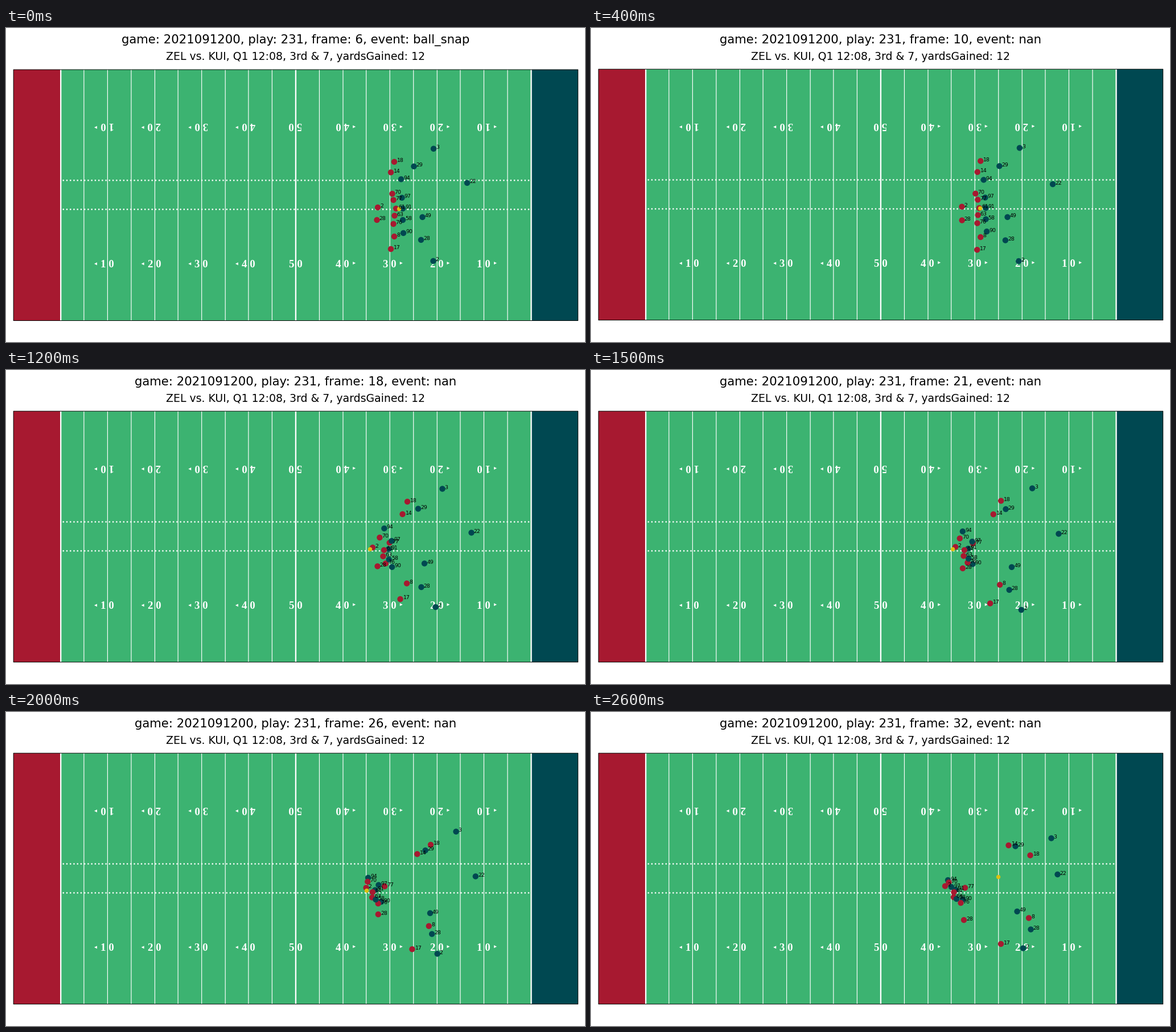
Write a matplotlib script that moves like this. It is 1017 px wide and 551 px high and loops after 2700 ms.

```python
import numpy as np
import matplotlib.pyplot as plt
from matplotlib.animation import FuncAnimation
from matplotlib.patches import Polygon, Rectangle

W, H = 1017, 551
S = W / 1200              # layout unit in pixels
PT = S * 100 / 72         # layout point in pixels
LEFT, TOP, YARD = 15 * S, 72.2, 9.75 * S
DEPTH = 53.3 * YARD
RED, TEAL, GREEN, GOLD = "#a71930", "#004851", "#3cb371", "#dbc010"
FRAMES, FIRST = 27, 6
LAST = FRAMES - 1
EVENTS = {0: "ball_snap", 23: "pass_forward"}

# At 72 dpi one point is one pixel
plt.rcParams["font.family"] = "DejaVu Sans"
fig = plt.figure(figsize=(W / 72, H / 72), dpi=72, facecolor="white")
ax = fig.add_axes([0, 0, 1, 1])
ax.set_xlim(0, W)
ax.axis("off")


def yard_x(yard):
    return LEFT + yard * YARD


def crisp_x(yard):
    """Centre of the layout unit that holds the yard."""
    return (np.floor(yard_x(yard) / S + 0.5) + 0.5) * S


def box(start, end, color, edge="none", z=0):
    x = crisp_x(start)
    ax.add_patch(Rectangle((x, TOP), crisp_x(end) - x, DEPTH, snap=False,
                           facecolor=color, edgecolor=edge, lw=0.8 * PT,
                           zorder=z))


def line(xs, ys, width, style="-"):
    ax.plot(xs, ys, style, color="white", lw=width * PT, snap=False,
            solid_capstyle="butt", zorder=1)


def arrow(x, y, side):
    tip, base = x + 2.7 * side, x - 2.3 * side
    ax.add_patch(Polygon([(tip, y), (base, y - 2.5), (base, y + 2.5)],
                         facecolor="white", edgecolor="none", zorder=2))


def number(x, y, label, angle):
    ax.text(x, y, label, color="white", family="Liberation Serif",
            weight="bold", size=16 * PT, ha="center", va="baseline",
            rotation=angle, rotation_mode="anchor", zorder=2)


def draw_field():
    box(0, 120, GREEN)
    box(0, 10, RED)
    box(110, 120, TEAL)
    for yard in range(10, 111, 5):
        x = crisp_x(yard)
        line([x, x], [TOP, TOP + DEPTH], 2 if yard in (10, 60, 110) else 1)
    for y in (266.5, 317.4):
        line([crisp_x(10.5), crisp_x(110) - 1], [y, y], 2, ":")
    for yard in range(20, 101, 10):
        x = yard_x(yard)
        label = f"{5 - abs(yard - 60) // 10} 0"
        number(x, 419.2, label, 0)
        number(x, 165.6, label, 180)
        side = np.sign(yard - 60)
        if side:
            for y in (412.3, 173):
                arrow(x + 20.3 * side, y - 0.6 * side, side)
    box(0, 120, "none", "black", 3)


def smooth(u):
    return u * u * (3 - 2 * u)


def late(u):
    return u ** 1.6


def slide(ease, start, end):
    """Move from start to end with one easing."""
    start, end = np.array(start), np.array(end)
    return lambda t: start + (end - start) * ease(t / LAST)


def route(*points):
    """Leave from rest and run a smooth curve through the key points."""
    times = np.array([0, 12, 18, LAST])
    pts = np.array(points, float)
    slopes = np.gradient(pts, times, axis=0, edge_order=2)
    slopes[0] = 0

    def at(t):
        k = min(np.searchsorted(times, t, side="right"), len(times) - 1) - 1
        h = times[k + 1] - times[k]
        u = (t - times[k]) / h
        return (pts[k] + (pts[k + 1] - pts[k]) * smooth(u)
                + slopes[k] * h * u * (1 - u) ** 2
                - slopes[k + 1] * h * u * u * (1 - u))
    return at


players = []


def add(jersey, color, path):
    label = ax.text(0, 0, str(jersey), size=8 * PT, color="black", zorder=6)
    players.append((path, color, label))


def ball_at(t):
    # Snap, drop back, wind up, throw
    times = (0, 3, 12, 18, 22, LAST)
    return (np.interp(t, times, (690, 689, 639, 630, 636, 715)),
            np.interp(t, times, (316, 316, 314, 313.5, 313, 289)))


draw_field()

# Coverage
add(3, TEAL, route((751, 211), (766.5, 208.5), (784.5, 208), (808.5, 221.5)))
add(29, TEAL, route((716.5, 242), (724, 243.5), (733.5, 244), (745.5, 235.5)))
add(22, TEAL, route((810, 271), (817.5, 285.5), (824.5, 288.5), (819.5, 285)))
add(49, TEAL, route((731.5, 331), (735, 339.5), (743, 351.5), (748.5, 350)))
add(28, TEAL, route((729, 371), (729.5, 381), (742, 389.5), (772.5, 381.5)))
add(2, TEAL, route((750.5, 408), (754.5, 416), (757, 424.5), (759, 414.5)))

# Receivers
add(18, RED, route((682, 234), (705, 231), (736.5, 230), (771.5, 251.5)))
add(14, RED, route((676, 252.5), (696.5, 253), (717, 252), (733.5, 234)))
add(8, RED, route((682, 365), (704, 374.5), (733.5, 377.5), (769, 361.5)))
add(17, RED, route((676, 387), (692.5, 402), (709.5, 415.5), (720, 407)))

# Pass rush, pocket and backfield
add(94, TEAL, slide(smooth, (694, 264.5), (627, 295)))
add(91, TEAL, slide(smooth, (697, 316), (640.5, 312)))
add(90, TEAL, slide(smooth, (698, 359), (653, 329)))
add(70, RED, slide(smooth, (678.5, 290), (628.5, 299)))
add(77, RED, slide(late, (680.5, 301), (657, 308.5)))
add(2, RED, slide(late, (653, 314), (622, 305.5)))
add(61, RED, slide(smooth, (685, 316), (637.5, 316)))
add(63, RED, slide(smooth, (682.5, 328.5), (637, 325)))
add(76, RED, slide(smooth, (680.5, 343), (649.5, 335)))
add(28, RED, slide(late, (651.5, 336), (655, 365)))
add(58, TEAL, slide(smooth, (697, 336), (642, 328)))
add(97, TEAL, slide(late, (695.5, 297), (633, 307)))

dots = ax.scatter(*np.zeros((2, len(players))), s=10.4 ** 2, linewidths=0,
                  c=[color for _, color, _ in players], zorder=4)
ball = ax.scatter([0], [0], s=7.4 ** 2, c=GOLD, linewidths=0, zorder=5)

title = fig.text(0.5, 1 - 27.1 / H, "", size=18 * PT, ha="center",
                 va="baseline")
fig.text(0.5, 1 - 55.6 / H, "ZEL vs. KUI, Q1 12:08, 3rd & 7, yardsGained: 12",
         size=16 * PT, ha="center", va="baseline")


def update(i):
    event = EVENTS.get(i, "nan")
    title.set_text(f"game: 2021091200, play: 231, frame: {i + FIRST}, "
                   f"event: {event}")
    # A deep underscore in the title pushes the field down a little
    drop = S if "_" in event else 0
    ax.set_ylim(H - drop, -drop)
    spots = []
    for path, _, label in players:
        x, y = path(i)
        spots.append((x, y))
        label.set_position((x + YARD / 2, y + 0.5))
    dots.set_offsets(spots)
    ball.set_offsets([ball_at(i)])
    return [title, dots, ball]


anim = FuncAnimation(fig, update, frames=FRAMES, interval=100,
                     repeat=True, repeat_delay=0, blit=False)
plt.show()
```
